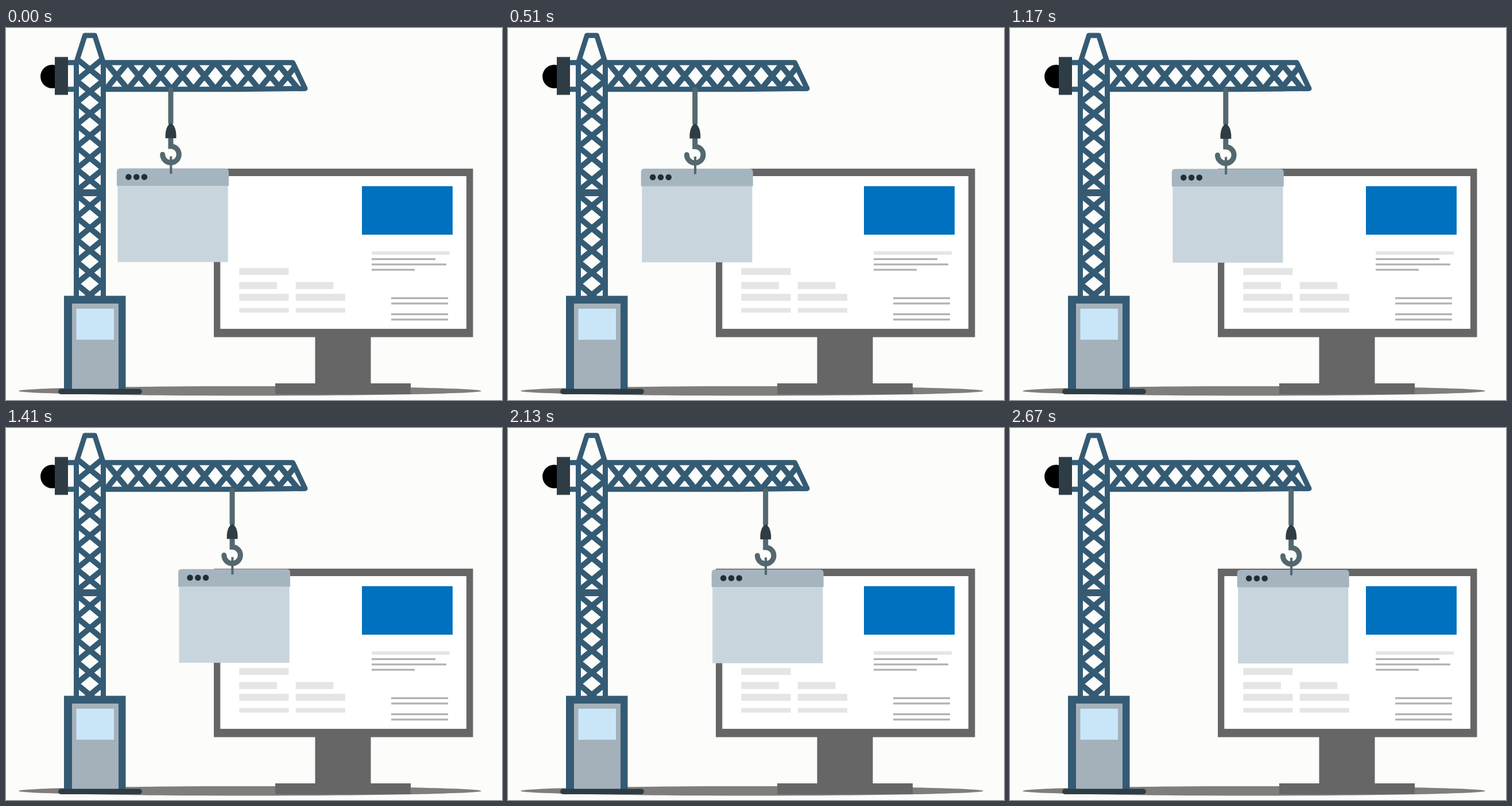
Write an HTML page that moves like this. It is 864 by 648 pixels and loops after 2.7 s.

```html
<!DOCTYPE html>
<html lang="en">
<head>
<meta charset="utf-8">
<title>Crane at work</title>
<style>
  html, body { margin: 0; width: 100%; height: 100%; overflow: hidden; background: #fcfcfa; }
  svg { display: block; width: 100%; height: 100%; }
  .steel { fill: none; stroke: #355b74; stroke-width: 9; stroke-linejoin: round; }
  .iron { fill: #2e3d45; }
  .gray { fill: #666; }
  .rope { fill: none; stroke: #53686f; stroke-width: 9; stroke-linecap: round; }
</style>
</head>
<body>
<svg viewBox="0 0 864 648" xmlns="http://www.w3.org/2000/svg">
  <clipPath id="frame"><path d="M118 40H174V56H500L526 110H174V470H118Z"/></clipPath>
  <ellipse cx="425" cy="632.2" rx="403" ry="8.3" fill="#7f7e7c"/>

  <g id="monitor">
    <rect class="gray" x="362" y="245" width="451.5" height="293.5"/>
    <rect class="gray" x="538.5" y="538" width="97" height="82"/>
    <rect class="gray" x="469" y="619" width="236" height="19"/>
    <rect x="373.3" y="258" width="428.7" height="266" fill="#fff"/>
    <rect x="620" y="275.5" width="158" height="84.5" fill="#0071be"/>
    <path id="blocks" fill="#e5e5e5"/>
    <path id="lines" fill="#b1b1b1"/>
  </g>

  <g id="crane">
    <circle cx="80.5" cy="84.500" r="20.5"/>
    <path class="steel" d="M106 60.300H122M106 106.700H122"/>
    <rect class="iron" x="85" y="50.5" width="23" height="66"/>
    <path class="steel" id="lattice" clip-path="url(#frame)" style="stroke-width:10"/>
    <path class="steel" d="M122.500 470V60L137.500 13H154.500L169.500 60V470"/>
    <path class="steel" d="M169 60.200H499.500L521 105.500L400 106.700H169"/>
    <path class="steel" d="M118 287H174" style="stroke-width:12"/>
    <rect x="101" y="466.5" width="107.5" height="165.5" fill="#355b74"/>
    <rect x="115" y="480" width="81" height="149" fill="#a4b1bb"/>
    <rect x="122.5" y="489" width="65.5" height="54" fill="#c9e6f9"/>
    <rect class="iron" x="91" y="628.5" width="146" height="9.5" rx="4.7"/>
  </g>

  <g id="load">
    <rect x="194.5" y="270" width="192.2" height="137.7" fill="#c9d5dd"/>
    <path fill="#a5b5bf" d="M193 275v-24.500q0 -6 6 -6h183q6 0 6 6v24.500z"/>
    <path id="dots" stroke="#222e35" stroke-width="10.6" stroke-linecap="round"/>
    <path class="rope" d="M287 107.500V165"/>
    <path class="rope" d="M287 188V206a14.300 14.300 0 1 1 -14.300 14.300"/>
    <path class="iron" d="M277.700 192v-7q1 -12 6.500 -17.500q2.900 -3 5.800 0q5.500 5.500 6.500 17.500v7z"/>
    <rect x="285.3" y="223.5" width="4.1" height="30.5" fill="#53686f"/>
  </g>
</svg>
<script>
  const LOOP = 2700, STEP = 30;
  const repeat = (n, fn) => Array.from({ length: n }, (_, i) => fn(i)).join('');
  const setPath = (id, d) => document.getElementById(id).setAttribute('d', d);
  const bar = (x, y, w, h) => `M${x} ${y}h${w}v${h}h${-w}z`;

  // One X of the truss, filling its box from corner to corner
  const cross = (x, y, w, h) => `M${x} ${y}l${w} ${h}m${-w} 0l${w} ${-h}`;
  const tower = (n, y, pitch) => repeat(n, i => cross(122.5, y + i * pitch, 47, pitch));
  const jib = (n, x, pitch) => repeat(n, i => cross(x + i * pitch, 60.2, pitch, 46.5));

  setPath('lattice',
    tower(6, 53, 38.5) + tower(5, 290.5, 38.8) + jib(8, 174, 38.15) + jib(1, 471.5, 38.15));

  setPath('dots', repeat(3, i => `M${213.5 + i * 13.75} 259.500h.01`));

  // Two columns of text blocks: a heading, then three rows
  const blockRow = i => {
    const y = 418 + i * 22.5 + (i % 2) * 2;
    const w = i === 1 ? 65.7 : 86.2, h = i === 3 ? 8.3 : 12.3;
    return repeat(i ? 2 : 1, col => bar(406.3 + col * 98.4, y, w, h));
  };
  setPath('blocks', bar(637, 389, 136, 6) + repeat(4, blockRow));

  // A ragged paragraph, then two pairs of rules
  setPath('lines',
    repeat(3, i => bar(637, 401 + i * 9.3, [111, 130, 75][i], 3.2)) +
    repeat(4, i => bar(671, 469 + (i >> 1) * 28 + (i % 2) * 9.2, 99, 3.2)));

  const load = document.getElementById('load');
  function draw(now) {
    const t = Math.floor((now % LOOP) / STEP) * STEP;
    const k = t / (LOOP - STEP);
    load.setAttribute('transform', `translate(${202.7 * k} ${2.5 * k})`);
  }
  const start = performance.now();
  function tick() {
    draw(performance.now() - start);
    requestAnimationFrame(tick);
  }
  tick();
</script>
</body>
</html>
```
